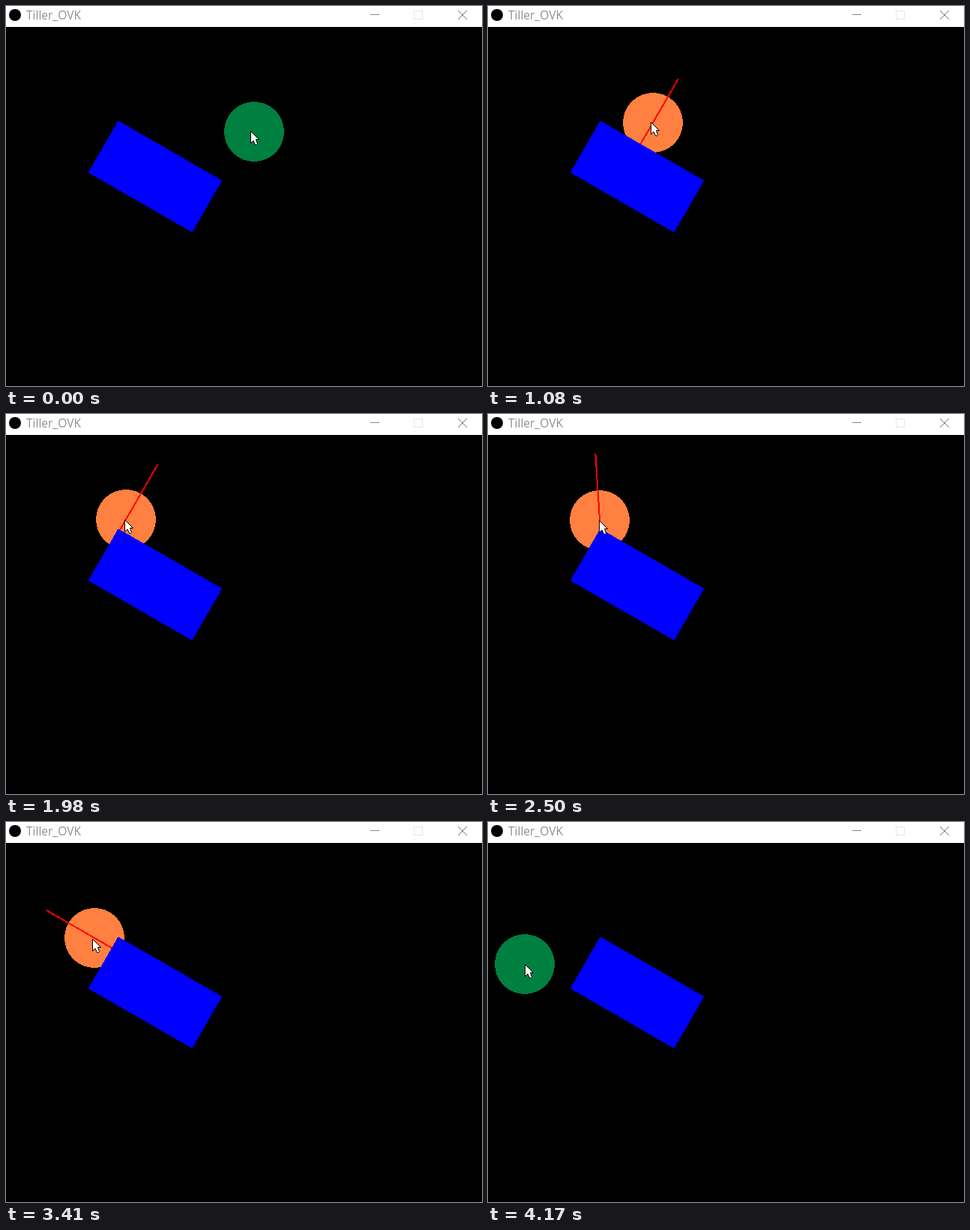
An HTML page that plays this animation: 635 by 508 pixels, repeating every 4.26 s.

```html
<!DOCTYPE html>
<html lang="en">
<head>
<meta charset="utf-8">
<title>Circle and rectangle collision</title>
<style>
  html, body { margin: 0; width: 100%; height: 100%; overflow: hidden; background: #000; }
  svg { display: block; width: 635px; height: 508px; }
  text { font: 15.5px "Open Sans", "Noto Sans", sans-serif; fill: #8f8f8f; }
</style>
</head>
<body>
<svg viewBox="0 0 635 508">
  <rect width="635" height="508"/>
  <g shape-rendering="crispEdges">
    <circle id="ball" r="40"/>
    <line id="normal" stroke="#f00" stroke-width="2" stroke-linecap="round"/>
    <rect id="box" fill="#00f"/>
  </g>
  <path id="cursor" d="M.5.5V16.5L4 13 6.5 18.5H8.5L9.5 17.5 7.5 11.5H11.5Z"
        fill="#fff" stroke="#000" stroke-linejoin="round"/>
  <rect width="635" height="28" fill="#fff"/>
  <circle cx="12" cy="12" r="8"/>
  <text x="27" y="18">Tiller_OVK</text>
  <g fill="none">
    <path d="M486 11.5H498" stroke="#888"/>
    <rect x="544.5" y="6.5" width="11" height="11" stroke="#e6e6e6"/>
    <path d="M603 6L615 18M615 6L603 18" stroke="#777"/>
  </g>
</svg>
<script>
const LOOP = 4260;
const REDRAW = 47;        // ms between redraws
const POINTER_LEAD = 40;  // ms by which the pointer runs ahead of the ball
const RADIUS = 40;
const NORMAL_LENGTH = 100;
const BOX = { x: 199, y: 228, halfW: 80, halfH: 40, angle: 30 };
const COS = Math.cos(BOX.angle * Math.PI / 180);
const SIN = Math.sin(BOX.angle * Math.PI / 180);

// key points of the drag: time, x, y
const PATH = [
  [0, 331, 168], [610, 255, 160], [1080, 220, 156], [1550, 178, 143],
  [2180, 154, 141], [2500, 149, 142], [3070, 134, 146], [3450, 114, 156],
  [3690, 85, 160], [4170, 49, 190]
];
const LAST = PATH.length - 1;

const el = id => document.getElementById(id);
const clamp = (v, limit) => Math.max(-limit, Math.min(limit, v));

function setAttrs(node, attrs) {
  for (const name in attrs) node.setAttribute(name, attrs[name]);
}

function slope(i, axis) {
  const a = PATH[i], b = PATH[i + 1];
  return (b[axis] - a[axis]) / (b[0] - a[0]);
}

// harmonic mean of neighbouring slopes keeps the curve monotone
function tangent(i, axis) {
  const before = slope(Math.max(i - 1, 0), axis);
  const after = slope(Math.min(i, LAST - 1), axis);
  return before * after > 0 ? 2 * before * after / (before + after) : 0;
}

function segmentAt(time) {
  let i = 0;
  while (i < LAST - 1 && time >= PATH[i + 1][0]) i++;
  return i;
}

function positionAt(time) {
  const t = Math.min(time, PATH[LAST][0]);
  const i = segmentAt(t);
  const a = PATH[i], b = PATH[i + 1];
  const span = b[0] - a[0];
  const u = (t - a[0]) / span, v = 1 - u;
  const [x, y] = [1, 2].map(axis => Math.round(
    a[axis] * (1 + 2 * u) * v * v + b[axis] * u * u * (3 - 2 * u) +
    span * u * v * (tangent(i, axis) * v - tangent(i + 1, axis) * u)));
  return { x, y };
}

// redraws are evenly spaced from each key point on
function lastRedraw(time) {
  if (time >= PATH[LAST][0]) return PATH[LAST][0];
  const from = PATH[segmentAt(time)][0];
  return from + Math.floor((time - from) / REDRAW) * REDRAW;
}

function closestOnBox(p) {
  const dx = p.x - BOX.x, dy = p.y - BOX.y;
  const u = clamp(dx * COS + dy * SIN, BOX.halfW);
  const v = clamp(dy * COS - dx * SIN, BOX.halfH);
  return { x: BOX.x + u * COS - v * SIN, y: BOX.y + u * SIN + v * COS };
}

function draw(time) {
  const tick = lastRedraw(time);
  const center = positionAt(tick);
  const tip = positionAt(tick + POINTER_LEAD);
  const touch = closestOnBox(center);
  const dx = center.x - touch.x, dy = center.y - touch.y;
  const distance = Math.hypot(dx, dy);
  const hit = distance < RADIUS;

  setAttrs(el("ball"), { cx: center.x, cy: center.y, fill: hit ? "#ff8040" : "#008040" });
  setAttrs(el("normal"), {
    x1: touch.x, y1: touch.y,
    x2: touch.x + dx / distance * NORMAL_LENGTH,
    y2: touch.y + dy / distance * NORMAL_LENGTH,
    visibility: hit ? "visible" : "hidden"
  });
  setAttrs(el("cursor"), { transform: `translate(${tip.x} ${tip.y})` });
}

setAttrs(el("box"), {
  x: -BOX.halfW, y: -BOX.halfH, width: 2 * BOX.halfW, height: 2 * BOX.halfH,
  transform: `translate(${BOX.x} ${BOX.y}) rotate(${BOX.angle})`
});

const start = performance.now();
function frame() {
  draw((performance.now() - start) % LOOP);
  requestAnimationFrame(frame);
}
frame();
</script>
</body>
</html>
```
